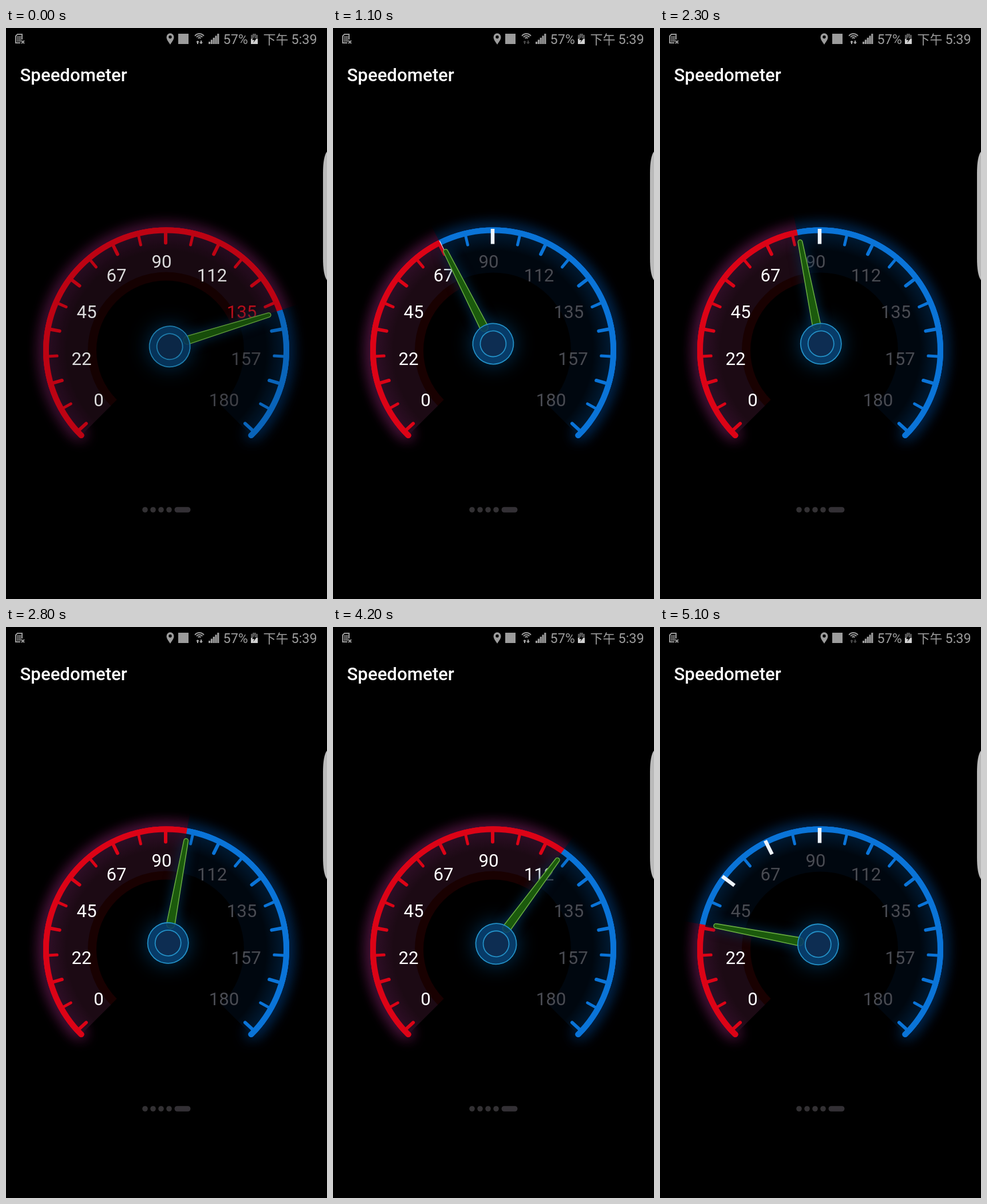
An HTML page with a canvas that plays this animation: 561 px wide and 998 px high, repeating every 5.2 s.

```html
<!DOCTYPE html>
<html lang="en">
<head>
<meta charset="utf-8">
<title>Speedometer</title>
<style>
  html, body { margin: 0; width: 100%; height: 100%; overflow: hidden; background: #000; }
  canvas { display: block; }
</style>
</head>
<body>
<canvas id="stage" width="561" height="998"></canvas>
<script>
const W = 561, H = 998, LOOP = 5200, STEP = 100;
const RAD = Math.PI / 180, TAU = Math.PI * 2;
const CX = 280, CY = 563.5;          // dial centre
const PX = 281, PY = 557;            // needle pivot
const GREY = '#9c9c9c';
const screen = document.getElementById('stage').getContext('2d');

// [time, needle angle], 0 degrees points straight up
const keys = [
  [0, 72.7], [400, 104], [500, 104], [1100, -26.8], [1700, -110], [1800, -105.7],
  [2600, 18], [2800, 10.4], [3300, -46], [3700, -2.7], [4030, 52], [4200, 36.6],
  [5100, -79.3], [5200, -87]
];
const labels = [
  ['0', 162, 650], ['22', 132, 578], ['45', 141, 496], ['67', 193, 432], ['90', 272, 408],
  ['112', 360, 432], ['135', 412, 496], ['157', 419.5, 578], ['180', 381, 650]
];

// Tangent is flat at turning points so the needle never overshoots them
function slope(i) {
  const a = keys[i - 1], b = keys[i], c = keys[i + 1];
  if (!a || !c) {
    const [p, q] = a ? [a, b] : [b, c];
    return (q[1] - p[1]) / (q[0] - p[0]);
  }
  return (b[1] - a[1]) * (c[1] - b[1]) <= 0 ? 0 : (c[1] - a[1]) / (c[0] - a[0]);
}

function angleAt(t) {
  let i = 0;
  while (i < keys.length - 2 && t >= keys[i + 1][0]) i++;
  const [t0, a] = keys[i], [t1, b] = keys[i + 1];
  const d = t1 - t0, u = (t - t0) / d, v = 1 - u;
  return v * v * (1 + 2 * u) * a + u * u * (3 - 2 * u) * b
    + d * u * v * (v * slope(i) - u * slope(i + 1));
}

function circle(c, x, y, r, fill, stroke) {
  c.beginPath();
  c.arc(x, y, r, 0, TAU);
  if (fill) { c.fillStyle = fill; c.fill(); }
  if (stroke) { c.strokeStyle = stroke; c.stroke(); }
}

function text(c, str, x, y, font, color, align = 'left') {
  c.font = font;
  c.fillStyle = color;
  c.textAlign = align;
  c.fillText(str, x, y);
}

function ring(c, from, to, fill) {
  c.beginPath();
  c.arc(CX, CY, to, 135 * RAD, 405 * RAD);
  c.arc(CX, CY, from, 405 * RAD, 135 * RAD, true);
  c.fillStyle = fill;
  c.fill();
}

function makeDial(o) {
  const layer = document.createElement('canvas');
  layer.width = W;
  layer.height = H;
  const c = layer.getContext('2d');
  c.fillRect(0, 0, W, H);
  const arc = () => {
    c.beginPath();
    c.arc(CX, CY, 210, 135 * RAD, 405 * RAD);
    c.stroke();
  };
  c.lineCap = 'round';
  c.lineWidth = 10;
  c.strokeStyle = o.line;
  c.shadowColor = o.glow;
  c.shadowBlur = 27;
  arc();
  arc();
  c.shadowBlur = 0;

  const shade = c.createRadialGradient(CX, CY, 135, CX, CY, 207);
  shade.addColorStop(0, o.inner);
  shade.addColorStop(0.55, o.inner);
  shade.addColorStop(1, o.outer);
  ring(c, 136, 207, shade);
  if (o.rim) ring(c, 122, 137, o.rim);
  arc();

  for (let i = 0; i <= 20; i++) {
    const major = i % 2 === 0, white = o.whiteTicks && major && i <= 10;
    c.save();
    c.translate(CX - 1, CY + 0.5);
    c.rotate((i - 10) * 13.25 * RAD);
    c.lineCap = white ? 'butt' : 'round';
    c.lineWidth = white ? 6.5 : major ? 6 : 5;
    c.strokeStyle = white ? '#eef4fb' : o.line;
    c.beginPath();
    c.moveTo(0, white ? -213 : -207);
    c.lineTo(0, white ? -186.5 : major ? -188.5 : -190);
    c.stroke();
    c.restore();
  }
  labels.forEach(([s, x, y], i) =>
    text(c, s, x, y + 11, '31.2px Roboto, sans-serif', i < 6 ? o.low : o.high, 'center'));
  return layer;
}

const blueDial = makeDial({
  line: '#0a74d8', glow: '#004084', inner: '#00070f', outer: '#001a33',
  low: '#494b52', high: '#494b52', whiteTicks: true
});
const redDial = makeDial({
  line: '#dc0316', glow: '#7c2064', inner: '#1c0a14', outer: '#2e0e26', rim: '#190101',
  low: '#fff', high: '#d8101e'
});

function drawNeedle(c, angle) {
  c.save();
  c.translate(PX, PY);
  c.rotate(angle * RAD);

  c.shadowColor = '#00365f';
  c.shadowBlur = 36;
  circle(c, 1.3, -5, 36, '#08385f');
  c.shadowBlur = 20;
  c.beginPath();
  c.arc(0, -38, 7.2, 0, Math.PI);
  c.arc(0, -186.5, 3.8, Math.PI, TAU);
  c.closePath();
  c.fillStyle = '#1b5a0c';
  c.fill();
  c.shadowBlur = 0;
  c.lineWidth = 1.6;
  c.strokeStyle = '#66a83e';
  c.stroke();

  c.lineWidth = 1.8;
  circle(c, 1.3, -5, 35.5, 'rgba(8,60,106,.86)', '#2390c6');
  circle(c, 1.3, -5, 22.5, '#0d2d52', '#2390c6');
  c.restore();
}

function drawGauge(c, angle) {
  c.drawImage(blueDial, 0, 0);
  c.save();
  c.beginPath();
  c.moveTo(PX, PY);
  c.arc(PX, PY, 320, 90 * RAD, (angle + 269.5) * RAD);
  c.clip();
  c.drawImage(redDial, 0, 0);
  c.restore();
  drawNeedle(c, angle);
}

function drawStatusBar(c, transferring) {
  c.strokeStyle = c.fillStyle = GREY;
  c.lineCap = 'butt';

  // memory card
  c.lineWidth = 2;
  c.stroke(new Path2D('M28 20V11H20L17 14V26H25M27 22L32 27M32 22L27 27'));
  for (let i = 0; i < 9; i++) c.fillRect(19.2 + i % 3 * 2.6, 14.5 + Math.floor(i / 3) * 3.4, 2, 2.5);

  // location pin
  c.fill(new Path2D('M287 29C283 23 280.5 20 280.5 15.8A6.5 6.5 0 0 1 293.5 15.8C293.5 20 291 23 287 29Z'));
  circle(c, 287, 15.8, 2.7, '#000');

  c.fillStyle = GREY;
  c.fillRect(301, 10, 18, 18);

  // wireless
  c.lineWidth = 2;
  for (const r of [3, 6.5, 10]) {
    c.beginPath();
    c.arc(338, 20, r, 218 * RAD, 322 * RAD);
    c.stroke();
  }
  c.fillStyle = transferring ? '#b4b4b4' : '#4c4c4c';
  c.fill(new Path2D('M335 22L338 25H336V28H334V25H332ZM341 28L338 25H340V22H342V25H344Z'));

  // signal
  c.fillStyle = GREY;
  for (let i = 0; i < 5; i++) c.fillRect(354 + i * 3.8, 24 - i * 3.5, 3.2, 4 + i * 3.5);

  // battery
  c.fillStyle = '#555';
  c.fillRect(428, 12, 12, 16);
  c.fillRect(431, 10, 6, 2);
  c.fillStyle = '#d0d0d0';
  c.fillRect(428, 19, 12, 9);
  c.fillStyle = '#000';
  c.fill(new Path2D('M436 13L430 21H434L432 26L438 18H434Z'));

  text(c, '57%', 379.5, 28, '23.4px Roboto, sans-serif', GREY);
  text(c, '下午', 449.5, 28, '22px "Noto Sans CJK TC", "Noto Sans CJK SC", "Noto Sans CJK JP", sans-serif', GREY);
  text(c, '5:39', 498.5, 28, '23.4px Roboto, sans-serif', GREY);
}

function drawPage(c) {
  text(c, 'Speedometer', 24.5, 93, '500 31.2px Roboto, sans-serif', '#fff');
  for (let i = 0; i < 4; i++) circle(c, 243 + i * 14, 842, 4.8, '#333134');
  c.fillStyle = '#333035';
  c.beginPath();
  c.roundRect(294.5, 837.2, 28, 9.6, 4.8);
  c.fill();
  c.fillStyle = '#bababa';
  c.fill(new Path2D('M561 216C556 222 554 236 554 254V402C554 421 556 434 561 441Z'));
}

function render(t) {
  screen.fillStyle = '#000';
  screen.fillRect(0, 0, W, H);
  drawGauge(screen, angleAt(t));
  const dim = 0.14 * Math.max(0, 1 - t / 400);
  screen.fillStyle = `rgba(0,0,0,${dim})`;
  screen.fillRect(0, 0, W, H);
  drawStatusBar(screen, t < 700 || (t >= 2000 && t < 4500));
  drawPage(screen);
}

const start = performance.now();
function tick() {
  const t = (performance.now() - start) % LOOP;
  render(Math.floor(t / STEP) * STEP);
  requestAnimationFrame(tick);
}
tick();
</script>
</body>
</html>
```
